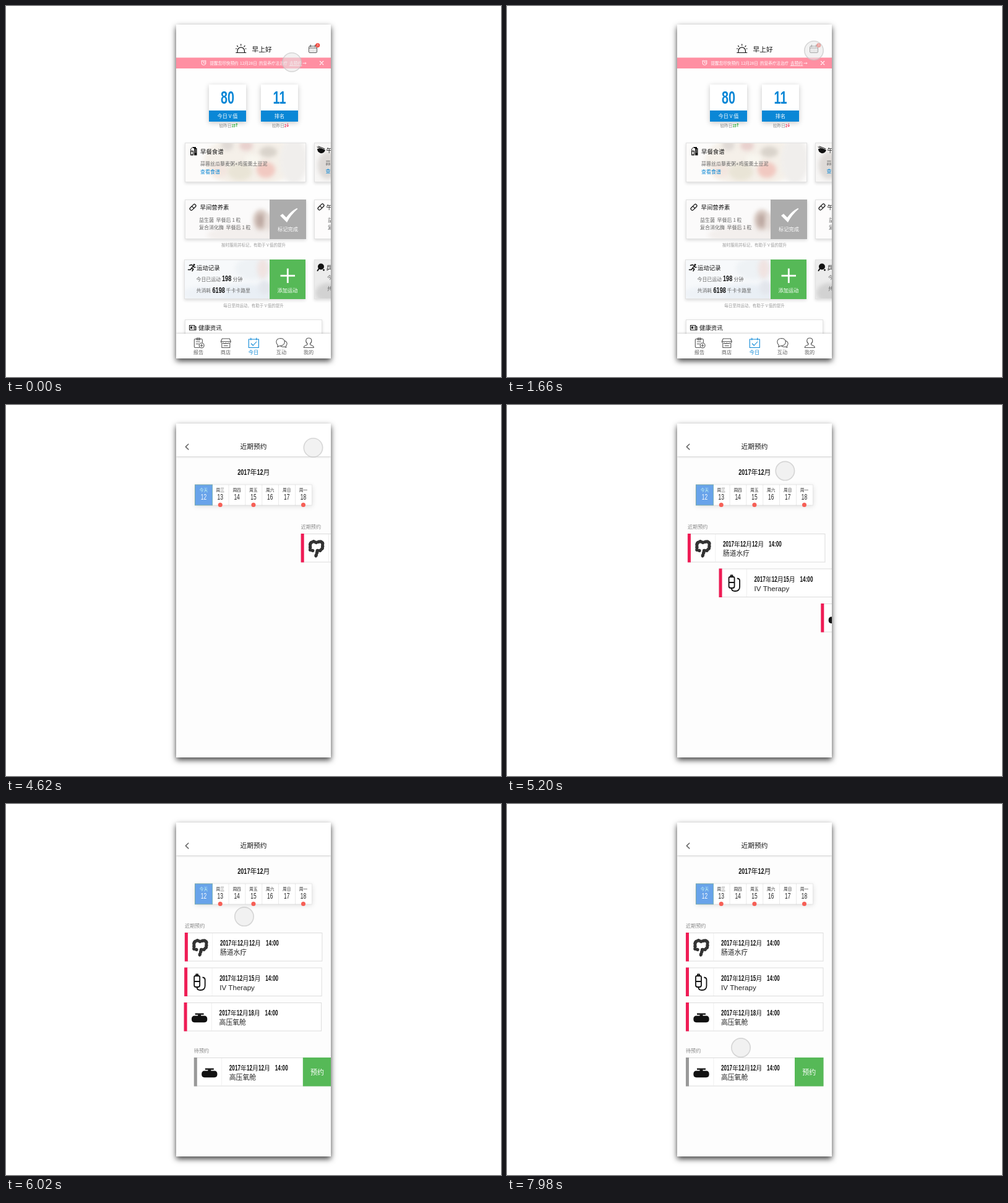
An HTML page with a canvas for the animation above (8000 ms loop, 800 by 600 pixels).

```html
<!DOCTYPE html>
<html lang="zh-CN">
<head>
<meta charset="utf-8">
<title>预约</title>
<style>
html, body { margin: 0; width: 100%; height: 100%; overflow: hidden; background: #fff; }
canvas { display: block; }
</style>
</head>
<body>
<canvas id="stage" width="800" height="600"></canvas>
<script>
const ctx = document.getElementById('stage').getContext('2d');
const LOOP = 8000;
const CJK = '"Noto Sans CJK SC", "Noto Sans CJK", sans-serif';
const LATIN = '"Liberation Sans", sans-serif';
const NARROW = 0.68; // condensed look for numerals
const BLUE = '#0a87d6', GREEN = '#56b957', PINK = '#ef1c55', INK = '#111', GRAY = '#666';

const clamp = v => Math.max(0, Math.min(1, v));
const fade = (t, start) => clamp((t - start) / 300);

function text(s, x, y, size, color = INK, weight = 400, align = 'left', family = CJK) {
  ctx.font = `${weight} ${size}px ${family}`;
  ctx.fillStyle = color;
  ctx.textAlign = align;
  ctx.fillText(s, x, y);
}

// Numerals in the condensed style; returns the advance.
function digits(s, x, y, size, color = INK, weight = 700, align = 'left') {
  ctx.save();
  ctx.translate(x, y);
  ctx.scale(NARROW, 1);
  text(s, 0, 0, size, color, weight, align, LATIN);
  const width = ctx.measureText(s).width * NARROW;
  ctx.restore();
  return width;
}

function dateText(s, x, y, size) {
  for (const part of s.match(/[\d:]+|[^\d:]+/g)) {
    if (/\d/.test(part)) x += digits(part, x, y, size);
    else {
      text(part, x, y, size * 0.83, INK, 500);
      x += ctx.measureText(part).width;
    }
  }
}

function rect(x, y, w, h, color) {
  ctx.fillStyle = color;
  ctx.fillRect(x, y, w, h);
}

function shadowRect(x, y, w, h, color, blur, offset, shadow) {
  ctx.save();
  ctx.shadowColor = shadow;
  ctx.shadowBlur = blur;
  ctx.shadowOffsetY = offset;
  rect(x, y, w, h, color);
  ctx.restore();
}

function frame(x, y, w, h, color = '#dcdcdc') {
  ctx.strokeStyle = color;
  ctx.lineWidth = 1;
  ctx.strokeRect(x + 0.5, y + 0.5, w - 1, h - 1);
}

function stroke(d, color = INK, width = 1.2, dash = []) {
  ctx.save();
  ctx.strokeStyle = color;
  ctx.lineWidth = width;
  ctx.lineCap = ctx.lineJoin = 'round';
  ctx.setLineDash(dash);
  ctx.stroke(new Path2D(d));
  ctx.restore();
}

function fillPath(d, color = INK) {
  ctx.fillStyle = color;
  ctx.fill(new Path2D(d));
}

function dot(x, y, r, color) {
  ctx.fillStyle = color;
  ctx.beginPath();
  ctx.arc(x, y, r, 0, 7);
  ctx.fill();
}

function at(x, y, draw) {
  ctx.save();
  ctx.translate(x, y);
  draw();
  ctx.restore();
}

// Soft picture made of blurred ellipses: [x, y, rx, ry, color].
function softPicture(x, y, w, h, base, blobs) {
  ctx.save();
  ctx.beginPath();
  ctx.rect(x, y, w, h);
  ctx.clip();
  rect(x, y, w, h, base);
  ctx.filter = 'blur(3px)';
  for (const [cx, cy, rx, ry, color] of blobs) {
    ctx.fillStyle = color;
    ctx.beginPath();
    ctx.ellipse(cx, cy, rx, ry, 0, 0, 7);
    ctx.fill();
  }
  ctx.restore();
}

function panel(x, y, w, h, base, blobs = []) {
  shadowRect(x, y, w, h, '#fff', 5, 2, 'rgba(0,0,0,.14)');
  softPicture(x, y, w, h, base, blobs);
  frame(x, y, w, h, '#e2e2e2');
}

function scoreCard(x, value, label, change, arrow, color) {
  shadowRect(x, 127, 60, 60, '#fff', 8, 2, 'rgba(0,0,0,.22)');
  rect(x, 169, 60, 18, BLUE);
  digits(value, x + 30, 158, 29, BLUE, 700, 'center');
  text(label, x + 30, 181, 8.2, '#fff', 400, 'center');
  const left = x + (change.length > 1 ? 16.5 : 18);
  text('较昨日', left, 195.5, 6.6, '#888');
  const end = left + 20 + digits(change, left + 20, 195.5, 8, color);
  const tip = arrow > 0 ? 190 : 195;
  stroke(`M${end + 2.2} 190V195M${end + 0.9} ${tip + arrow * 1.5}L${end + 2.2} ${tip}L${end + 3.5} ${tip + arrow * 1.5}`, color, 0.9);
}

function pill(x, y) {
  at(x, y, () => {
    ctx.rotate(-Math.PI / 4);
    stroke('M-3.5 -2.4H3.5A2.4 2.4 0 0 1 3.5 2.4H-3.5A2.4 2.4 0 0 1 -3.5 -2.4ZM0 -2.4V2.4', INK, 1.2);
  });
}

function homeHeader() {
  stroke('M371.8 75.5H387.8M374 74.5V72.5A5.7 5.7 0 0 1 385.4 72.5V74.5M379.7 61.8V63.7M373.5 64.3L374.7 65.7M386 64.3L384.8 65.7M371.5 69H372.7M387 69H388', INK, 1.2);
  text('早上好', 397.5, 74, 10.7, INK, 500);
  stroke('M491 65H501Q502.5 65 502.5 66.5V74Q502.5 75.5 501 75.5H491Q489.5 75.5 489.5 74V66.5Q489.5 65 491 65ZM489.5 68H502.5M492.5 63V66M499.5 63V66', '#555', 1);
  stroke('M492 71H500.5M492 73.3H500.5', '#666', 1, [0.2, 2.6]);
  dot(503.7, 63.6, 3.5, '#f0483e');
  text('3', 503.7, 65.4, 5, '#fff', 400, 'center');

  rect(275, 83.5, 250, 17.5, '#ff8fa2');
  stroke('M323 92A3.5 3.5 0 1 1 316 92A3.5 3.5 0 1 1 323 92M319.5 90V92.3H321M315.5 89.2L317 88M322 88L323.5 89.2', '#fff', 0.9);
  text('提醒您尽快预约', 329.5, 95, 6.6, '#fff');
  text('12月28日', 378, 95, 6.6, '#fff');
  text('的营养疗法治疗', 409, 95, 6.6, '#fff');
  text('去预约', 458, 95, 6.6, '#fff');
  stroke('M458 96.7H478M480 92.5H485M483.6 91.3L485 92.5L483.6 93.7', '#fff', 0.7);
  stroke('M507.4 89.4L512.8 94.8M512.8 89.4L507.4 94.8', '#fff', 1.2);
}

function homeCards() {
  panel(289, 221, 196, 64, '#fcfbfa', [
    [395, 250, 75, 42, '#f5f0e9'], [358, 225, 10, 9, '#dfd9d5'], [388, 226, 11, 8, '#e8d0cd'],
    [424, 236, 14, 9, '#d9d3cb'], [465, 250, 22, 38, '#f0eeec'], [345, 266, 14, 11, '#f3e6df'],
    [378, 268, 20, 14, '#e9e4d6'], [420, 265, 15, 13, '#f1c9c1'], [398, 248, 12, 8, '#f8f6ef']
  ]);
  fillPath('M302 228H307V230H308.5V241.5H304V230H302ZM298 234H303V241.5H298ZM299.3 235.3V240H301.8V235.3Z');
  stroke('M298.7 233.5V231L301.5 228.5', INK, 1);
  stroke('M305.2 233H307.3M305.2 236H307.3', '#fff', 0.8);
  text('早餐食谱', 314, 239.3, 9.4, INK, 500);
  text('蒜蓉丝瓜藜麦粥+鸡蛋羹土豆泥', 314, 258, 8, GRAY);
  text('查看食谱', 314, 270.8, 8, BLUE);

  panel(498, 221, 60, 64, '#f7f6f5', [[520, 258, 16, 22, '#dedad7']]);
  fillPath('M503 231Q509 229 516 233Q514 239 508 238Q503 236 503 231Z');
  stroke('M503 228L514 232.5M505 227L515 231', INK, 1);
  text('午餐', 517.5, 237, 9.4, INK, 500);
  text('蒜蓉', 516.5, 257, 8, GRAY);
  text('查看', 516.5, 270, 8, BLUE);

  panel(289, 313, 196, 64, '#fbfafa', [
    [385, 370, 60, 14, '#f3efed'], [412, 346, 13, 17, '#d9cbc4'], [411, 347, 6, 11, '#bda9a2'], [424, 350, 5, 14, '#e4dad5']
  ]);
  pill(302, 325.5);
  text('早间营养素', 313.5, 329, 9.4, INK, 500);
  text('益生菌  早餐后 1 粒', 312, 348.8, 8, GRAY);
  text('复合消化酶  早餐后 1 粒', 312, 361.4, 8, GRAY);
  rect(426, 313, 59, 64, '#acacac');
  fillPath('M443 339L447 336L453 342Q460 332 470 327L471.5 328Q460 338 454 350Z', '#fff');
  text('标记完成', 455.5, 364, 8.2, '#fff', 400, 'center');
  text('按时服用并标记，有助于 V 值的提升', 400, 389, 6.5, '#999', 400, 'center');
  panel(498, 313, 60, 64, '#fdfcfc');
  pill(509, 325);
  text('午间', 517.5, 329, 9.4, INK, 500);
  text('益生', 520, 348.8, 8, GRAY);
  text('复合', 520, 361.4, 8, GRAY);

  panel(288, 410, 196, 64, '#f7f9fb', [
    [390, 470, 60, 20, '#e9eff5'], [400, 425, 30, 18, '#eef2f5'], [415, 425, 9, 16, '#f0e3e1'], [418, 455, 10, 12, '#e3e6ec'], [320, 466, 36, 12, '#eef2f7']
  ]);
  dot(304, 418.5, 1.5, INK);
  stroke('M296.5 419.5L300 418.5L302.8 420.5L299.8 424L302.8 425.5L301 428.5M299.8 424L298 426.5H294.5M302.8 420.5L304 422.5H306', INK, 1.5);
  text('运动记录', 308, 427, 9.4, INK, 500);
  text('今日已运动', 307.5, 444.8, 7.9, GRAY);
  digits('198', 349, 445, 13.4);
  text('分钟', 366.5, 444.8, 7.9, GRAY);
  text('共消耗', 307.5, 463.2, 7.9, GRAY);
  digits('6198', 333.5, 464, 13.4);
  text('千卡卡路里', 355.5, 463.2, 7.9, GRAY);
  rect(426, 410, 58, 64, GREEN);
  rect(443.5, 434.8, 23.5, 2.8, '#fff');
  rect(453.9, 424.5, 2.8, 23.5, '#fff');
  text('添加运动', 455, 463.4, 8.2, '#fff', 400, 'center');
  text('每日坚持运动，有助于 V 值的提升', 400, 487, 6.5, '#999', 400, 'center');
  panel(498, 410, 60, 64, '#ececec', [[522, 464, 22, 16, '#d2d2d2']]);
  dot(509, 421.5, 5, INK);
  stroke('M505.5 425L503.5 428', INK, 2);
  dot(513.5, 427, 1.4, INK);
  text('乒乓', 517.5, 426.5, 9.4, INK, 500);
  text('今日', 519, 441.5, 8, GRAY);
  text('共消', 519, 459.5, 8, GRAY);

  panel(289, 507, 222, 40, '#fff');
  stroke('M296.5 516.5H305V524H296.5ZM305 518.5H307V524H305', INK, 1.1);
  rect(298, 518.2, 3, 3.6, INK);
  stroke('M302.6 518.8H303.7M302.6 521H303.7', INK, 0.8);
  text('健康资讯', 311, 523.5, 9.4, INK, 500);
}

function tabBar() {
  shadowRect(275, 530, 250, 40, '#fff', 3, -1, 'rgba(0,0,0,.18)');
  const tabs = [
    [311, '报告', 'M1 7.5H-5.5Q-7 7.5 -7 6V-5Q-7 -6.5 -5.5 -6.5H4.5Q6 -6.5 6 -5V-1M-3 -8H2V-5H-3ZM-4 -2H2M-4 1.5H0M8.8 4A4 4 0 1 1 .8 4A4 4 0 1 1 8.8 4M4.8 2V6M2.8 4H6.8'],
    [355, '商店', 'M-6 -7H6L8 -2.5Q7.5 1 4 0Q2 2 0 0Q-2 2 -4 0Q-7.5 1 -8 -2.5ZM-8 -2.5H8M-6.5 1V7.5H6.5V1M-3 4.5H3'],
    [400, '今日', 'M-8 -6H8V7.5H-8ZM-4.5 -8V-5M4.5 -8V-5M-4 1L-1 4L4.5 -2'],
    [445, '互动', 'M-2 4.5Q-5 5 -6.5 6.5L-6 3.3Q-8.5 1 -8.5 -2Q-8 -7.5 -1.5 -7.5Q5 -7 5 -1.5Q4.5 4 -2 4.5M5.2 -3.5Q9 -2 8.8 1.5Q8.5 3.5 7 4.8L7.5 7.3L4.5 6Q1 7 -1.5 4.8'],
    [489, '我的', 'M-2 1.5Q-5 -1 -4.5 -4.5Q-4 -8 0 -8Q4 -8 4.5 -4.5Q5 -1 2 1.5Q2 3 4.5 3.7Q8 4.7 8 7.5H-8Q-8 4.7 -4.5 3.7Q-2 3 -2 1.5Z']
  ];
  for (const [x, label, icon] of tabs) {
    const active = label === '今日';
    at(x + 0.3, 545, () => stroke(icon, active ? BLUE : '#555', 1.1));
    text(label, x, 562.8, 8.2, active ? BLUE : GRAY, 400, 'center');
  }
}

function home() {
  rect(275, 30, 250, 540, '#fefefe');
  homeHeader();
  scoreCard(328, '80', '今日 V 值', '15', 1, '#2bab36');
  scoreCard(412, '11', '排名', '2', -1, '#ef2b55');
  homeCards();
  tabBar();
}

function pageHeader() {
  rect(275, 30, 250, 540, '#fdfdfd');
  shadowRect(275, 30, 250, 53, '#fff', 3, 1, 'rgba(0,0,0,.2)');
  stroke('M294.8 63.3L290.3 67.6L294.8 71.9', GRAY, 1.5);
  text('近期预约', 400, 71, 10.7, INK, 500, 'center');
}

function calendar() {
  dateText('2017年12月', 374.3, 112.5, 13.3);
  shadowRect(305.5, 129, 189, 33, '#fff', 8, 2, 'rgba(0,0,0,.12)');
  const step = 26.85;
  ['今天', '周三', '周四', '周五', '周六', '周日', '周一'].forEach((day, i) => {
    const x = 319.4 + step * i, today = i === 0;
    if (today) {
      rect(305.5, 129, 28, 33, '#68a3ea');
      frame(305, 128.5, 29, 34, '#7db4b8');
    } else if (i > 1) rect(x - step / 2, 129, 0.8, 33, '#e4e4e4');
    text(day, x, 139.8, 6.7, today ? '#c8fbf4' : '#222', 400, 'center');
    digits(String(12 + i), x, 153, 12.4, today ? '#fff' : '#222', 400, 'center');
  });
  frame(305, 128.5, 190, 34, 'rgba(0,0,0,.07)');
  for (const i of [1, 3, 6]) dot(319.4 + step * i, 161.5, 3.5, '#f65f56');
}

// Icons are centred on the icon cell of a card.
const icons = {
  colon() {
    const d = 'M-6 4L-10 3V-8L-5 -11L0 -9L6 -11L10 -9V0L6 4L1 4V7L-1 13';
    stroke(d, '#222', 4.2);
    stroke(d, '#333', 5.4, [0.1, 4.2]);
  },
  drip() {
    stroke('M-7 -10H-2Q0 -10 0 -8V5Q0 8 -3 8H-6Q-9 8 -9 5V-8Q-9 -10 -7 -10ZM-9 -1H0M-6 -10V-12.5H-3V-10M-4.5 8V9Q-4.5 13 1 13Q8.5 13 8.5 6V-4Q8.5 -7 5 -7.5', INK, 1.8);
  },
  chamber() {
    fillPath('M-8 -2H8Q12.7 -2 12.7 3.5Q12.7 8.7 8 8.7H-8Q-12.7 8.7 -12.7 3.5Q-12.7 -2 -8 -2Z');
    rect(-7, -6, 14, 2.3, INK);
    rect(-2.5, -4, 5, 3, INK);
  }
};

const cards = [
  { y: 208, start: 4469, icon: 'colon', date: '2017年12月12月', name: '肠道水疗', label: '近期预约' },
  { y: 264.5, start: 4784, icon: 'drip', date: '2017年12月15月', name: 'IV Therapy' },
  { y: 321, start: 5102, icon: 'chamber', date: '2017年12月18月', name: '高压氧舱' },
  { y: 410, start: 5428, icon: 'chamber', date: '2017年12月12月', name: '高压氧舱', label: '待预约', open: true }
];

// Slightly underdamped spring from one screen width to zero.
function slideOffset(ms) {
  if (ms <= 0) return 250;
  const phase = ms * 0.00602, damping = 0.85;
  const swing = Math.sqrt(1 - damping * damping);
  return 250 * Math.exp(-damping * phase) *
    (Math.cos(swing * phase) + damping / swing * Math.sin(swing * phase));
}

function card({ y, icon, date, name, label, open }) {
  if (label) text(label, 0, -8.5, 8.1, '#888');
  rect(0, 0, 222.5, 46.5, '#fff');
  frame(0, 0, 222.5, 46.5);
  rect(44.5, 1, 0.8, 44.5, '#ececec');
  rect(0, 0, 5, 46.5, open ? '#999' : PINK);
  at(25, 23.5, icons[icon]);
  dateText(date, 57, 21.2, 12);
  digits('14:00', 131, 21.2, 12);
  const latin = /^\w/.test(name);
  text(name, 57, latin ? 36 : 36.2, latin ? 11.6 : 10.8, '#222', 400, 'left', latin ? LATIN : CJK);
  if (open) {
    rect(176, 0, 46.5, 46.5, GREEN);
    text('预约', 199.3, 28, 11, '#fff', 400, 'center');
  }
}

// Pointer stops: time, x, y.
const stops = [
  [0, 462, 91], [1660, 496, 72], [2100, 496.5, 69], [4760, 496.5, 69], [5200, 449.5, 106.5],
  [6020, 385, 182], [7000, 364, 290], [7980, 378, 394], [8600, 425, 425]
];

// Monotone cubic through the stops, so that rests stay at rest.
function pointerAxis(t, axis) {
  let i = 0;
  while (t > stops[i + 1][0]) i++;
  const slope = k => stops[k] && stops[k + 1]
    ? (stops[k + 1][axis] - stops[k][axis]) / (stops[k + 1][0] - stops[k][0]) : 0;
  const tangent = k => {
    const a = slope(k - 1), b = slope(k);
    return a * b > 0 ? 2 * a * b / (a + b) : 0;
  };
  const span = stops[i + 1][0] - stops[i][0], u = (t - stops[i][0]) / span;
  const blend = u * u * (3 - 2 * u);
  return stops[i][axis] * (1 - blend) + stops[i + 1][axis] * blend +
    span * u * (1 - u) * (tangent(i) * (1 - u) - tangent(i + 1) * u);
}

function pointer(t) {
  const x = pointerAxis(t, 1), y = pointerAxis(t, 2);
  dot(x, y, 15, 'rgba(232,232,232,.55)');
  ctx.strokeStyle = 'rgba(198,198,198,.7)';
  ctx.lineWidth = 1.6;
  ctx.beginPath();
  ctx.arc(x, y, 15.2, 0, 7);
  ctx.stroke();
}

function layer(alpha, draw) {
  if (alpha <= 0) return;
  ctx.save();
  ctx.globalAlpha = alpha;
  draw();
  ctx.restore();
}

function render() {
  const t = performance.now() % LOOP;
  const pageAlpha = fade(t, 2465);
  rect(0, 0, 800, 600, '#fff');
  shadowRect(275, 30, 250, 540, '#fff', 9, 4, 'rgba(0,0,0,.75)');
  ctx.save();
  ctx.beginPath();
  ctx.rect(275, 30, 250, 540);
  ctx.clip();
  if (pageAlpha < 1) home();
  layer(pageAlpha, pageHeader);
  layer(fade(t, 3360), calendar);
  for (const item of cards) at(289 + slideOffset(t - item.start), item.y, () => card(item));
  pointer(t);
  ctx.restore();
  requestAnimationFrame(render);
}
render();
</script>
</body>
</html>
```
